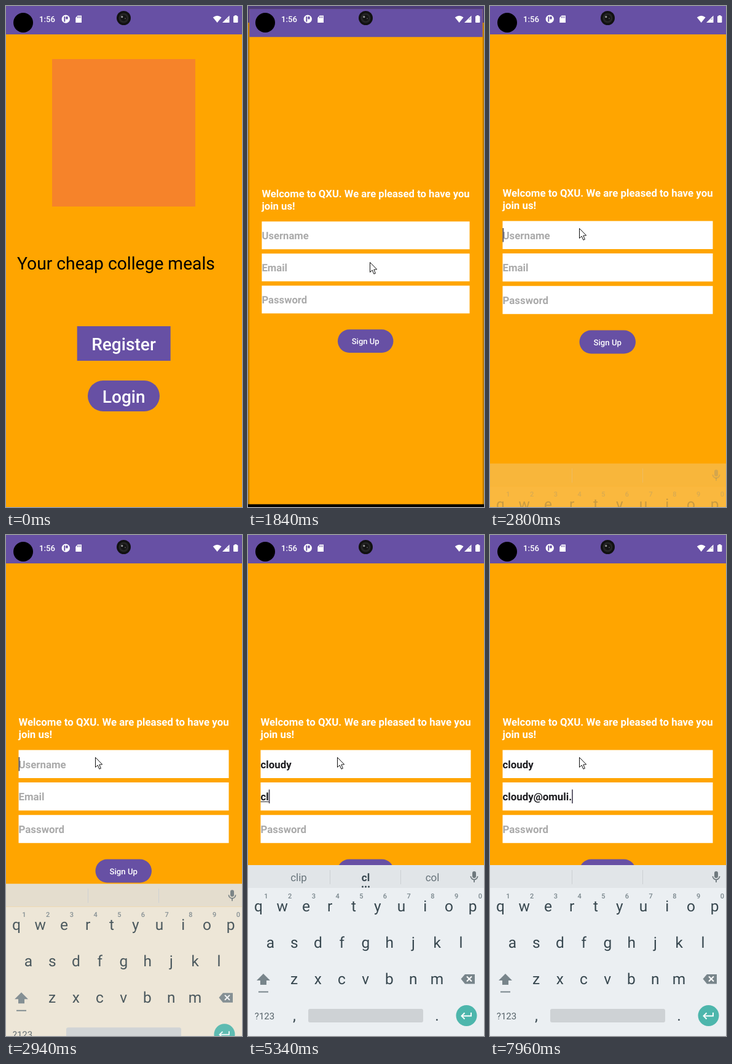
An HTML page with a canvas that plays this animation: 384x812 px, repeating every 8000 ms.

```html
<!DOCTYPE html>
<html lang="en">
<head>
<meta charset="utf-8">
<title>Sign up flow</title>
<style>
  html, body { margin: 0; width: 100%; height: 100%; overflow: hidden; background: #000; }
  canvas { display: block; width: 384px; height: 812px; }
</style>
</head>
<body>
<canvas id="stage" width="384" height="812"></canvas>
<script>
const W = 384, H = 812, LOOP = 8000, STEP = 67.5;
const ORANGE = '#ffa500', PURPLE = '#6750a4', INK = '#37474f', GREY = '#78858b';
const ctx = document.getElementById('stage').getContext('2d');
ctx.textRendering = 'geometricPrecision';

const clamp = v => Math.max(0, Math.min(1, v));
const lerp = (a, b, p) => a + (b - a) * p;

// Motion is held between screen refreshes, counted from the start of each move.
const moveStarts = [0, 130, 670, 1570, 2390, 2730];
function hold(t) {
  const start = moveStarts.filter(s => s <= t).pop();
  return start + Math.floor((t - start) / STEP) * STEP;
}

// time, user name, email, suggestions
const typing = [
  [0, '', '', ''],
  [3160, 'c', '', ''],
  [3230, 'c', '', 'can c co'],
  [3290, 'cl', '', 'can c co'],
  [3360, 'cl', '', 'clip cl col'],
  [3560, 'clo', '', 'clip cl col'],
  [3630, 'clo', '', 'close clo clock'],
  [3770, 'clou', '', 'cloud clou clouds'],
  [3840, 'cloud', '', 'cloudy cloud clouds'],
  [3970, 'cloudy', '', 'cloud cloudy clouds'],
  [4080, 'cloudy', '', ''],
  [5070, 'cloudy', 'c', ''],
  [5140, 'cloudy', 'c', 'can c co'],
  [5270, 'cloudy', 'cl', 'can c co'],
  [5340, 'cloudy', 'cl', 'clip cl col'],
  [5600, 'cloudy', 'clo', 'clip cl col'],
  [5670, 'cloudy', 'clo', 'close clo clock'],
  [5740, 'cloudy', 'clou', 'close clo clock'],
  [5810, 'cloudy', 'clou', 'cloud clou clouds'],
  [5940, 'cloudy', 'cloud', 'cloudy cloud clouds'],
  [6010, 'cloudy', 'cloudy', 'cloudy cloud clouds'],
  [6080, 'cloudy', 'cloudy', 'cloud cloudy clouds'],
  [6410, 'cloudy', 'cloudy@', 'cloud cloudy clouds'],
  [6480, 'cloudy', 'cloudy@', ''],
  [6820, 'cloudy', 'cloudy@o', ''],
  [6890, 'cloudy', 'cloudy@om', ''],
  [7030, 'cloudy', 'cloudy@om', 'on om omission'],
  [7290, 'cloudy', 'cloudy@omu', 'on om omission'],
  [7360, 'cloudy', 'cloudy@omul', 'on om omission'],
  [7560, 'cloudy', 'cloudy@omuli', 'on om omission'],
  [7630, 'cloudy', 'cloudy@omuli', 'omits omuli omission'],
  [7830, 'cloudy', 'cloudy@omuli.', 'omits omuli omission'],
  [7900, 'cloudy', 'cloudy@omuli.', '']
];

// time, x, y of the pointer tip
const pointerPath = [
  [130, 316, 717], [400, 274, 582], [602, 274, 582], [805, 274, 547],
  [1075, 210, 543], [1502, 210, 543], [1840, 198, 415], [2310, 145, 360], [LOOP, 145, 360]
];

function rect(x, y, w, h, color, r = 0) {
  ctx.fillStyle = color;
  ctx.beginPath();
  ctx.roundRect(x, y, w, h, r);
  ctx.fill();
}

function disc(x, y, r, color) {
  ctx.fillStyle = color;
  ctx.beginPath();
  ctx.arc(x, y, r, 0, Math.PI * 2);
  ctx.fill();
}

function poly(points, color) {
  ctx.fillStyle = color;
  ctx.beginPath();
  points.forEach(([x, y]) => ctx.lineTo(x, y));
  ctx.closePath();
  ctx.fill();
}

function line(points, color, width) {
  ctx.strokeStyle = color;
  ctx.lineWidth = width;
  ctx.beginPath();
  points.forEach(([x, y]) => ctx.lineTo(x, y));
  ctx.stroke();
}

function text(str, x, y, size, color, weight = 400, align = 'left') {
  ctx.font = `${weight} ${size}px Roboto, sans-serif`;
  ctx.fillStyle = color;
  ctx.textAlign = align;
  ctx.fillText(str, x, y);
}

function page() {
  rect(0, 0, W, H, ORANGE);
  rect(0, 0, W, 46, PURPLE);
}

function homePage() {
  page();
  rect(75, 86, 233, 239, '#f6832a');
  text('Your cheap college meals', 18, 426.7, 28.25, '#000');
  rect(115.7, 519, 152, 56, PURPLE);
  text('Register', 191.5, 558, 28.1, '#fff', 500, 'center');
  rect(133, 607, 117, 50, PURPLE, 25);
  text('Login', 191.7, 643, 28.1, '#fff', 500, 'center');
}

function field(y, value, hint, caret, composing) {
  const x = 20.5, base = y + 29.2;
  rect(x, y, 342, 45.5, '#fff');
  text(value || hint, x, base, 16.85, value ? '#1c1b1f' : '#aaa', 700);
  const width = s => ctx.measureText(s).width;
  if (composing && value) {
    const [head, tail] = value.split('@');
    const from = tail ? width(head + '@') : 0;
    rect(x + from, base + 1.6, width(tail || head), 1, '#1c1b1f');
  }
  if (caret) rect(x + width(value), y + 11.5, 1.7, 22.5, '#4b4658');
}

function signUpPage(t) {
  const [, user, email, hints] = typing.filter(s => s[0] <= t).pop();
  const onEmail = t >= 4080;
  const blinkOff = t >= 4540 && t < 5070;
  page();
  text('Welcome to QXU. We are pleased to have you', 20.5, 309, 16.85, '#fff', 700);
  text('join us!', 20.5, 329, 16.85, '#fff', 700);
  field(348.5, user, 'Username', t >= 2460 && !onEmail, hints && !onEmail);
  field(401, email, 'Email', onEmail && !blinkOff, hints && onEmail);
  field(453.7, '', 'Password');
  rect(145.5, 525.5, 91.5, 38, PURPLE, 19);
  text('Sign Up', 191.2, 549.5, 13.2, '#fff', 500, 'center');
  if (t >= 2730) slideKeyboard(t, hints);
}

function slideKeyboard(t, hints) {
  const p = Math.pow(clamp((hold(t) - 2730) / 270), 0.8);
  const shown = p * p * (3 - 2 * p);
  ctx.save();
  ctx.globalAlpha = shown;
  ctx.translate(0, (1 - shown) * 277);
  keyboard(hints);
  ctx.restore();
}

function keyboard(hints) {
  rect(0, 535, W, 37, '#e1e5e8');
  rect(0, 572, W, 240, '#ebeff2');
  [133.5, 248.5].forEach(x => rect(x - 0.5, 543, 1, 23, '#cbd0d3'));
  if (hints) {
    hints.split(' ').forEach((word, i) => {
      const middle = i === 1;
      text(word, [82.5, 191.5, 300][i], 561, 17, middle ? INK : '#67737a', middle ? 700 : 400, 'center');
    });
    [186.5, 191.5, 196.5].forEach(x => disc(x, 570, 1.5, INK));
  }
  mic();

  const row = (keys, x, y) => [...keys].forEach((k, i) =>
    text(k, x + i * 38.75, y, 24.5, INK, 400, 'center'));
  row('qwertyuiop', 17, 610);
  row('asdfghjkl', 36.5, 669);
  row('zxcvbnm', 75, 728);
  [...'1234567890'].forEach((d, i) => text(d, 29.5 + i * 38.7, 589, 11, GREY, 500, 'center'));

  poly([[25, 711], [36, 722], [30, 722], [30, 729], [20, 729], [20, 722], [14, 722]], GREY);
  rect(17, 739.5, 16, 2, GREY);
  poly([[346.5, 719.5], [353, 712], [369, 712], [369, 727.5], [353, 727.5]], GREY);
  line([[356, 715.5], [364, 723.5]], '#fff', 2);
  line([[364, 715.5], [356, 723.5]], '#fff', 2);

  text('?123', 27, 784.5, 15, '#56636a', 400, 'center');
  text(',', 75.5, 787, 25, INK, 400, 'center');
  rect(98, 768, 187, 22, '#ced2d5', 3);
  text('.', 307.5, 787, 25, INK, 400, 'center');
  disc(355.5, 779, 17, '#4db6ac');
  line([[363, 774], [363, 779.5], [348, 779.5]], '#fff', 1.9);
  line([[352.5, 774.5], [347.5, 779.5], [352.5, 784.5]], '#fff', 1.9);
}

function mic() {
  const color = '#6f797e';
  rect(365, 545, 6, 11, color, 3);
  ctx.strokeStyle = color;
  ctx.lineWidth = 1.7;
  ctx.beginPath();
  ctx.arc(368, 553, 5.6, 0, Math.PI);
  ctx.stroke();
  rect(367.1, 558, 1.8, 5, color);
}

function statusBar() {
  disc(28, 27, 16, '#000');
  text('1:56', 54, 26.3, 13.2, '#fff', 500);
  disc(97.3, 21.2, 6.6, '#fff');
  rect(94.3, 17, 2, 8.5, PURPLE);
  rect(97.3, 17, 3.4, 4.5, PURPLE, 1);
  poly([[116.5, 15.5], [123, 15.5], [123, 27], [113.3, 27], [113.3, 19]], '#fff');
  [116, 118.3, 120.6].forEach(x => rect(x, 17, 1, 2.6, PURPLE));

  disc(191.5, 19.5, 11.5, '#111');
  disc(191.5, 19.5, 8, '#252525');
  disc(191.5, 19.5, 5, '#141414');
  disc(188.8, 17.6, 1.6, '#999');
  disc(194, 20.3, 1, '#555');

  ctx.fillStyle = '#fff';
  ctx.beginPath();
  ctx.moveTo(343.7, 27);
  ctx.lineTo(336.8, 18.5);
  ctx.quadraticCurveTo(343.7, 12.8, 350.6, 18.5);
  ctx.fill();
  poly([[363.5, 15.5], [363.5, 27], [352, 27]], '#fff');
  poly([[361.8, 19], [361.8, 22], [358.5, 22]], '#b3a8d1');
  rect(370, 16.3, 7.4, 10.8, '#fff', 1);
  rect(372, 15, 3.4, 2, '#fff');
}

function scaled(s, draw) {
  ctx.save();
  ctx.translate(191.5, 425);
  ctx.scale(s, s);
  ctx.translate(-191.5, -425);
  draw();
  ctx.restore();
}

function openSignUp(t) {
  const age = hold(t) - 1570 + 30;
  const e = 1 - Math.pow(1 - clamp(age / 520), 3);
  const fade = clamp(age / 135);
  const s = lerp(0.85, 1, e);
  rect(0, 0, W, H, '#000');
  scaled(1 + 0.054 * e, homePage);
  rect(0, 0, W, H, `rgba(0,0,0,${0.25 * fade})`);
  const bottom = 425 + 387 * s;
  if (s < 1) rect(0, bottom, W, H - bottom, `rgba(0,0,0,${fade})`);
  ctx.globalAlpha = fade;
  scaled(s, () => {
    ctx.beginPath();
    ctx.rect(0, 0, W, H);
    ctx.clip();
    signUpPage(t);
  });
  ctx.globalAlpha = 1;
}

function pointerAt(t) {
  const i = pointerPath.findIndex(k => k[0] > t);
  const a = pointerPath[i - 1], b = pointerPath[i];
  const p = (t - a[0]) / (b[0] - a[0]);
  return [lerp(a[1], b[1], p), lerp(a[2], b[2], p)];
}

function pointer(t) {
  if (t < 130) return;
  const now = hold(t);
  const [x, y] = pointerAt(now);
  let glow = 0;
  if (now >= 735 && now < 1300) glow = clamp((1290 - now) / 200);
  if (now >= 2390 && now < 2660) glow = clamp((2660 - now) / 200);
  if (glow) disc(x, y, 12.5, `rgba(248,203,0,${glow})`);

  ctx.save();
  ctx.translate(x + 0.5, y + 0.5);
  ctx.lineJoin = 'round';
  poly([[0, 0], [0, 16], [3.7, 12.6], [6.4, 18.8], [8.9, 17.7], [6.3, 11.7], [11.2, 11.4]],
    glow ? '#fff8d0' : '#fff');
  ctx.strokeStyle = '#111';
  ctx.lineWidth = 1;
  ctx.stroke();
  ctx.restore();
}

function draw(t) {
  if (t < 1570) homePage();
  else if (t < 2310) openSignUp(t);
  else signUpPage(t);
  statusBar();
  pointer(t);
}

function tick() {
  draw(performance.now() % LOOP);
  requestAnimationFrame(tick);
}
tick();
</script>
</body>
</html>
```
